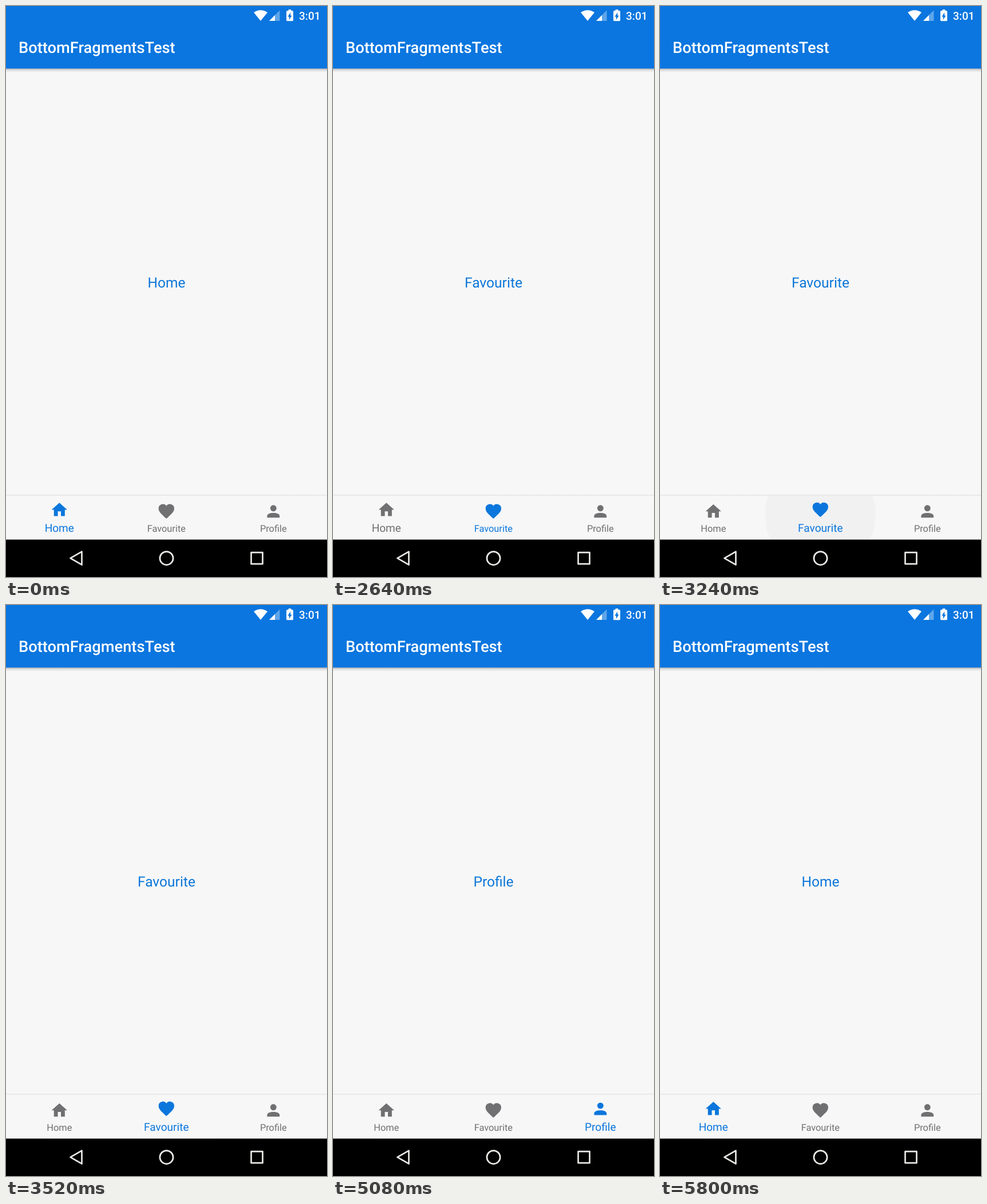
These frames come from a looping animation (561 by 998 pixels, 5.92 s). An HTML page:

```html
<!DOCTYPE html>
<html lang="en">
<head>
<meta charset="utf-8">
<title>BottomFragmentsTest</title>
<style>
  html, body { margin: 0; width: 100%; height: 100%; overflow: hidden; background: #000; }
  svg { display: block; width: 100vw; height: 100vh; }
  text { font-family: Roboto, sans-serif; text-rendering: geometricPrecision; }
  .mid { text-anchor: middle; }
</style>
</head>
<body>
<svg viewBox="0 0 561 998">
  <defs>
    <linearGradient id="shade" x2="0" y2="1">
      <stop offset="0" stop-opacity=".3"/>
      <stop offset=".4" stop-opacity=".11"/>
      <stop offset="1" stop-opacity="0"/>
    </linearGradient>
    <linearGradient id="edge" x2="0" y2="1">
      <stop offset="0" stop-opacity="0"/>
      <stop offset="1" stop-opacity=".08"/>
    </linearGradient>
    <clipPath id="bar"><rect y="856" width="561" height="76.6"/></clipPath>
  </defs>

  <rect width="561" height="998" fill="#f7f7f8"/>
  <rect y="109" width="561" height="7" fill="url(#shade)"/>
  <rect width="561" height="109.3" fill="#0b76df"/>
  <text x="22" y="81.6" font-size="27.27" font-weight="500" fill="#fff">BottomFragmentsTest</text>

  <g fill="#fff">
    <path d="M445 26 433 11.3Q445 3 457 11.3z"/>
    <path d="M460 26 478.5 7.5V26z" opacity=".35"/>
    <path d="M460 26 470 16V26z"/>
    <rect x="493.6" y="6.2" width="4.8" height="3"/>
    <rect x="490" y="8.2" width="12" height="18" rx="1.5"/>
    <path d="M497.2 11.2V16.7H499.6L494.8 24.2V18.7H492.4z" fill="#0b76df"/>
    <text x="512" y="23.8" font-size="19.09" font-weight="500">3:01</text>
  </g>

  <text id="page" class="mid" x="280.5" y="492.3" font-size="24.55" fill="#0b76d8"></text>

  <rect y="853" width="561" height="3" fill="url(#edge)"/>
  <circle id="ripple" cy="889" clip-path="url(#bar)"/>
  <g id="tabs" class="mid"></g>

  <rect y="932.6" width="561" height="65.4"/>
  <g fill="none" stroke="#e9e9e6" stroke-width="2.7" stroke-linejoin="round">
    <path d="M112.5 965.2 132.5 953.7V976.7z"/>
    <circle cx="280.5" cy="965.2" r="11.6"/>
    <rect x="428.5" y="955.2" width="20" height="20"/>
  </g>
</svg>
<script>
const LOOP = 5920, DP = 561 / 411.4, RIPPLE = 97;
const BLUE = '#0b76dc', GREY = '#707072';
const $ = id => document.getElementById(id);
const set = (el, attrs) => {
  for (const key in attrs) el.setAttribute(key, attrs[key]);
};
const add = tag => $('tabs').appendChild(document.createElementNS('http://www.w3.org/2000/svg', tag));

const icons = {
  Home: 'M10 20v-6h4v6h5v-8h3L12 3 2 12h3v8z',
  Favourite: 'M12 21.35C5.4 15.4 2 12.3 2 8.5A5.5 5.5 0 0 1 12 5.1 5.5 5.5 0 0 1 22 8.5C22 12.3 18.6 15.4 12 21.35z',
  Profile: 'M8 8a4 4 0 0 1 8 0 4 4 0 0 1-8 0zM4 20v-2c0-5.3 16-5.3 16 0v2z'
};

const tabs = Object.entries(icons).map(([name, d], i) => {
  const x = 280.3 + (i - 1) * 187;
  const icon = add('path'), label = add('text');
  set(icon, { d });
  set(label, { x, y: 919.3 });
  label.textContent = name;
  return { name, x, icon, label };
});

// Each tap moves in held beats: select, spread the ripple, then rest.
const taps = [
  { at: 2600, tab: 1, beat: 306, beats: 3 },
  { at: 3760, tab: 2, beat: 320, beats: 2 },
  { at: 5320, tab: 0, beat: 240, beats: 2 }
];
const rest = { at: -LOOP, tab: 0, beat: 1, beats: 1 };

function draw(t) {
  const { at, tab, beat, beats } = taps.findLast(tap => tap.at <= t) || rest;
  const n = Math.floor((t - at) / beat);
  const shift = Math.min(n, 1);
  const spread = n < beats ? n / (beats - 1) : 0;
  const previous = (tab + 2) % 3;

  $('page').textContent = tabs[tab].name;
  tabs.forEach(({ x, icon, label }, i) => {
    const lift = i === tab ? shift : i === previous ? 1 - shift : 0;
    const fill = i === tab ? BLUE : GREY;
    const y = 866.9 - 2 * DP * lift;
    set(icon, { fill, transform: `translate(${x - 12 * DP} ${y}) scale(${DP})` });
    set(label, { fill, 'font-size': (12 + 2 * lift) * DP });
  });
  set($('ripple'), {
    cx: tabs[tab].x - 4 * (1 - spread),
    r: RIPPLE * spread,
    opacity: 0.094 - 0.072 * spread
  });
}

function tick() {
  draw(performance.now() % LOOP);
  requestAnimationFrame(tick);
}
tick();
</script>
</body>
</html>
```
